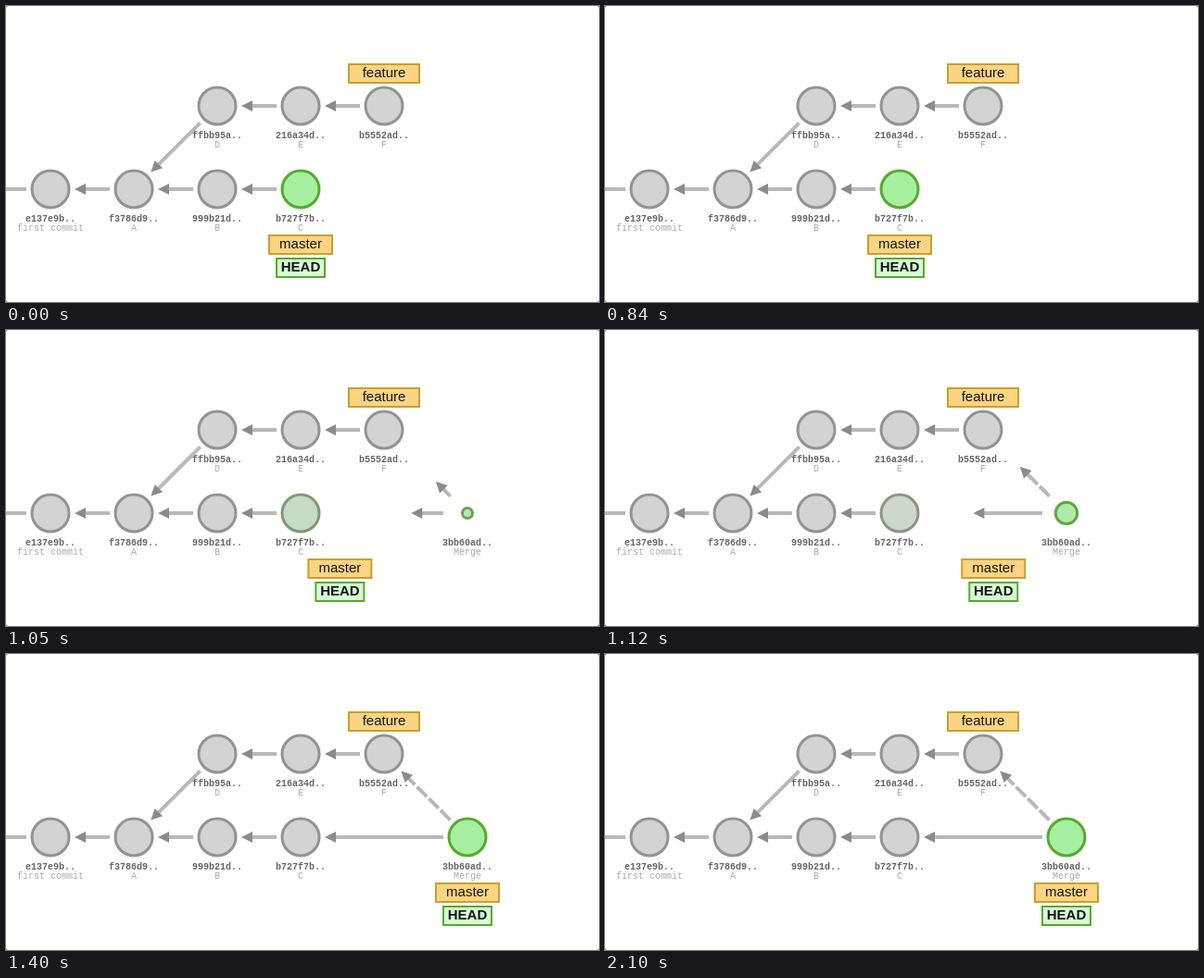
An HTML page with a canvas for the animation above (2.17 s loop, 640 px wide and 320 px high).

```html
<!DOCTYPE html>
<html lang="en">
<head>
<meta charset="utf-8">
<title>Merging a branch</title>
<style>
  html, body { margin: 0; width: 100%; height: 100%; overflow: hidden; background: #8a8a8a; }
  canvas { display: block; width: 640px; height: 320px; background: #fff; border-radius: 3px; }
</style>
</head>
<body>
<canvas id="stage" width="640" height="320"></canvas>
<script>
const ctx = document.getElementById("stage").getContext("2d");

const LOOP = 2170, STEP = 70;
const MOVE = { start: 845, length: 527 };
const FADE = { out: 840, in: 868, length: 500 };
const RADIUS = 20, LINE_GAP = 26, HEAD_GAP = 32;

const GREY = { fill: [211, 211, 211], stroke: [147, 147, 147] };
const GREEN = { fill: [166, 239, 160], stroke: [85, 171, 45] };
const BRANCH = { fill: "#fcd482", stroke: "#c9a02e", weight: "" };
const HEAD = { fill: "#d6ffd4", stroke: "#55ab2d", weight: "bold " };

const commit = (x, y, id, note) => ({ x, y, id, note });
const first = commit(48, 198, "e137e9b..", "first commit");
const a = commit(138, 198, "f3786d9..", "A");
const b = commit(228, 198, "999b21d..", "B");
const c = commit(318, 198, "b727f7b..", "C");
const d = commit(228, 108, "ffbb95a..", "D");
const e = commit(318, 108, "216a34d..", "E");
const f = commit(408, 108, "b5552ad..", "F");
const merge = commit(498, 198, "3bb60ad..", "Merge");
const root = { x: -42, y: 198 };

const history = [first, a, b, c, d, e, f];
const links = [[first, root], [a, first], [b, a], [c, b], [d, a], [e, d], [f, e]];

const clamp = v => Math.min(1, Math.max(0, v));
const mix = (from, to, k) => from + (to - from) * k;
const cubicInOut = t => t < 0.5 ? 4 * t ** 3 : 1 - 4 * (1 - t) ** 3;

// cubic-bezier(.25, .1, .25, 1)
function ease(t) {
  const bezier = (p1, p2, s) => 3 * p1 * s * (1 - s) ** 2 + 3 * p2 * s * s * (1 - s) + s ** 3;
  let lo = 0, hi = 1;
  for (let i = 0; i < 20; i++) {
    const mid = (lo + hi) / 2;
    if (bezier(0.25, 0.25, mid) < t) lo = mid; else hi = mid;
  }
  return bezier(0.1, 1, (lo + hi) / 2);
}

function tint(part, green) {
  const rgb = GREY[part].map((v, i) => Math.round(mix(v, GREEN[part][i], green)));
  return `rgb(${rgb.join(",")})`;
}

function drawLink(from, to, grown = 1, dash = []) {
  const dist = Math.hypot(to.x - from.x, to.y - from.y);
  const end = mix(LINE_GAP, dist - HEAD_GAP, grown);
  ctx.save();
  ctx.translate(from.x, from.y);
  ctx.rotate(Math.atan2(to.y - from.y, to.x - from.x));
  ctx.strokeStyle = "#b8b8b8";
  ctx.lineWidth = 4;
  ctx.setLineDash(dash);
  ctx.beginPath();
  ctx.moveTo(LINE_GAP, 0);
  ctx.lineTo(end, 0);
  ctx.stroke();
  ctx.fillStyle = "#8b8b8b";
  ctx.beginPath();
  ctx.moveTo(end - 6, -6);
  ctx.lineTo(end + 6, 0);
  ctx.lineTo(end - 6, 6);
  ctx.fill();
  ctx.restore();
}

function drawText(text, x, y, font, color) {
  ctx.font = font;
  ctx.fillStyle = color;
  ctx.textAlign = "center";
  ctx.fillText(text, x, y);
}

function drawCommit(node, green = 0, radius = RADIUS) {
  ctx.beginPath();
  ctx.arc(node.x, node.y, radius, 0, Math.PI * 2);
  ctx.fillStyle = tint("fill", green);
  ctx.strokeStyle = tint("stroke", green);
  ctx.lineWidth = 3;
  ctx.fill();
  ctx.stroke();
  const mono = '10px "Liberation Mono", "Courier New", monospace';
  drawText(node.id, node.x, node.y + 35, "bold " + mono, "#666");
  drawText(node.note, node.x, node.y + 45, mono, "#aaa");
}

function drawTag(name, x, y, style) {
  const width = name.length * 8 + 20;
  ctx.fillStyle = style.fill;
  ctx.strokeStyle = style.stroke;
  ctx.lineWidth = 2;
  ctx.beginPath();
  ctx.rect(x - width / 2, y, width, 20);
  ctx.fill();
  ctx.stroke();
  drawText(name, x, y + 14, style.weight + '15px "Liberation Sans", Arial, sans-serif', "#151515");
}

function draw(time) {
  const moved = cubicInOut(clamp((time - MOVE.start) / MOVE.length));
  const left = ease(clamp((time - FADE.out) / FADE.length));
  const arrived = ease(clamp((time - FADE.in) / FADE.length));
  const merging = time > MOVE.start;

  ctx.clearRect(0, 0, 640, 320);
  links.forEach(([from, to]) => drawLink(from, to));
  if (merging) {
    drawLink(merge, c, moved);
    drawLink(merge, f, moved, [15, 3]);
  }
  history.forEach(node => drawCommit(node, node === c ? 1 - left : 0));
  if (merging) drawCommit(merge, arrived, mix(1, RADIUS, moved));

  const tagX = mix(c.x, merge.x, moved);
  drawTag("feature", f.x, 63, BRANCH);
  drawTag("master", tagX, 248, BRANCH);
  drawTag("HEAD", tagX, 273, HEAD);
}

const origin = performance.now();
function tick() {
  const time = (performance.now() - origin) % LOOP;
  draw(Math.floor(time / STEP) * STEP);
  requestAnimationFrame(tick);
}
tick();
</script>
</body>
</html>
```
